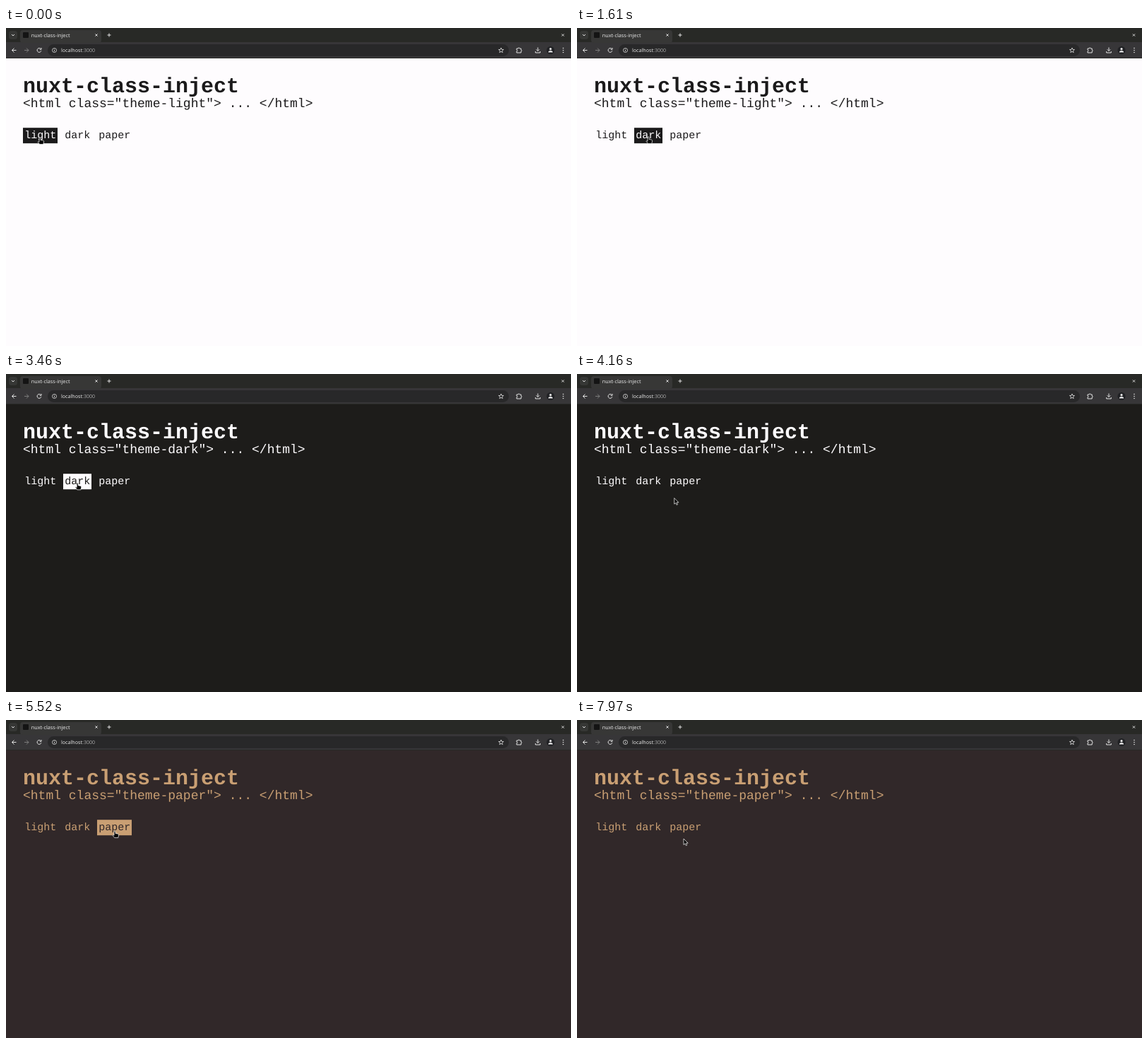
Recreate the animation shown at these times as an HTML page. Size 800 px wide and 450 px high, loop 8 s.

```html
<!DOCTYPE html>
<html lang="en">
<head>
<meta charset="utf-8">
<title>nuxt-class-inject</title>
<style>
  html, body { margin: 0; width: 100%; height: 100%; overflow: hidden; }
  svg { display: block; width: 800px; height: 450px; }
  text { white-space: pre; text-rendering: geometricPrecision; }
  #page { font-family: "Liberation Mono", monospace; }
  #chrome { font-family: "Noto Sans", sans-serif; }
  #icons { fill: none; stroke: #e2e2e2; }
</style>
</head>
<body>
<svg viewBox="0 0 800 450">
  <defs>
    <path id="plus" d="M-2.5 0h5M0-2.5v5"/>
    <path id="back" d="M3 0H-3M0-3L-3 0 0 3"/>
  </defs>
  <g id="page">
    <rect id="bg" width="800" height="450"/>
    <g id="ink">
      <text x="24" y="91" font-size="30" font-weight="bold">nuxt-class-inject</text>
      <text id="tag" x="24" y="112" font-size="18"></text>
    </g>
    <g id="buttons" font-size="15"></g>
  </g>
  <g id="chrome">
    <rect width="800" height="43" fill="#282926"/>
    <rect y="20" width="800" height="22" fill="#373638"/>
    <rect x="4" y="4" width="12" height="12" rx="3.5" fill="#363735"/>
    <rect x="20" y="3" width="115" height="18" rx="4" fill="#373736"/>
    <rect x="24" y="6" width="8" height="8" rx="1" fill="#141414"/>
    <text x="35.7" y="12.6" font-size="7.25" fill="#e2e2e2">nuxt-class-inject</text>
    <rect x="59" y="23" width="653" height="17" rx="8.5" fill="#282829"/>
    <text x="78" y="34" font-size="7.1" fill="#e2e2e2">localhost<tspan fill="#a2a2a2">:3000</tspan></text>
    <g id="icons">
      <path d="M8 9l2 2 2-2"/>
      <use href="#plus" transform="translate(128 10) rotate(45) scale(.9)"/>
      <use href="#plus" transform="translate(146 10)"/>
      <use href="#plus" transform="translate(788.5 10) rotate(45) scale(.9)"/>
      <use href="#back" transform="translate(11.5 31.5)"/>
      <use href="#back" transform="translate(29 31.5) scale(-1 1)" stroke="#7c7c7c"/>
      <path d="M49.3 29.7a2.9 2.9 0 1 0 .5 2.5M50 28v2.300h-2.300"/>
      <g stroke-width=".8">
        <circle cx="68.5" cy="31.5" r="3"/>
        <path d="M68.5 31v2.2M68.5 29.5v.8"/>
        <polygon id="star"/>
      </g>
      <path d="M723 29h2.200a1 1 0 0 1 2 0h2v2a1 1 0 0 1 0 2v2h-6.200v-2a1 1 0 0 0 0-2z"/>
      <path d="M753 27.5v5m-2.200-2.200l2.200 2.200 2.200-2.200M749.700 33v2h6.600v-2"/>
    </g>
    <circle cx="771" cy="31.5" r="5.5" fill="#202124"/>
    <g id="dots" fill="#e8e8e8">
      <circle cx="771" cy="29.7" r="1.6"/>
      <path d="M767.8 34.5a3.2 2.6 0 0 1 6.4 0z"/>
    </g>
  </g>
  <g fill="#050505" stroke="#fff" stroke-width=".7" stroke-linejoin="round">
    <path id="arrow" d="M0 0V8.500L2 6.800 3.300 9.700 4.700 9.100 3.500 6.200H6.200Z"/>
    <path id="hand" d="M-1 .4Q0-.7 1 .4V3.400L4.600 4.200Q5.700 4.500 5.600 5.800L4.800 9.600H-.3L-3 6.300Q-2.700 5-1 6.200Z"/>
  </g>
</svg>
<script>
const LOOP = 8000;
const BUTTON_TOP = 141.2, BUTTON_HEIGHT = 22;
const themes = [
  { at: 0, name: "light", bg: "#fefcfe", fg: "#1b1a1b" },
  { at: 2160, name: "dark", bg: "#1d1c1a", fg: "#fefcfe" },
  { at: 5520, name: "paper", bg: "#312829", fg: "#c99f73" },
];

// Each move eases to a new resting place, sagging below the straight line
const home = { x: 48, y: 155 };
const moves = [
  { from: 370, to: 1610, x: 101, y: 154, sag: 22 },
  { from: 3430, to: 4250, x: 139, y: 175, sag: 12 },
  { from: 4280, to: 4340, x: 147, y: 175, sag: 2 },
  { from: 4460, to: 4910, x: 154, y: 157, sag: 0 },
  { from: 7790, to: 7970, x: 151, y: 168, sag: 0 },
];

const $ = id => document.getElementById(id);
function add(parent, tag, attrs) {
  const el = document.createElementNS("http://www.w3.org/2000/svg", tag);
  for (const key in attrs) el.setAttribute(key, attrs[key]);
  return parent.appendChild(el);
}

for (const dy of [-3, 0, 3]) add($("dots"), "circle", { cx: 789, cy: 31.5 + dy, r: 0.8 });

$("star").setAttribute("points", Array.from({ length: 10 }, (_, i) => {
  const r = i % 2 ? 1.6 : 3.7, a = i * Math.PI / 5;
  return [701 + r * Math.sin(a), 31.7 - r * Math.cos(a)];
}).join(" "));

let left = 24;
const buttons = themes.map(({ name }) => {
  const x = left, w = name.length * 9 + 4;
  left += w + 8;
  const box = add($("buttons"), "rect", { x, y: BUTTON_TOP, width: w, height: BUTTON_HEIGHT });
  const label = add($("buttons"), "text", { x: x + 2.25, y: 156.4 });
  label.textContent = name;
  return { x, w, box, label };
});

function pointer(t) {
  let { x, y } = home;
  for (const m of moves) {
    const k = Math.min(1, Math.max(0, (t - m.from) / (m.to - m.from)));
    const e = k * k * (3 - 2 * k);
    x += (m.x - x) * e;
    y += (m.y - y) * e + m.sag * Math.sin(Math.PI * e);
  }
  return [x, y];
}

function draw(now) {
  const t = now % LOOP;
  const { name, bg, fg } = themes.findLast(theme => theme.at <= t);
  const [x, y] = pointer(t);
  let hovering = false;

  $("bg").setAttribute("fill", bg);
  $("ink").setAttribute("fill", fg);
  $("tag").textContent = `<html class="theme-${name}"> ... </html>`;
  for (const b of buttons) {
    const over = x >= b.x && x < b.x + b.w && y < BUTTON_TOP + BUTTON_HEIGHT;
    hovering ||= over;
    b.box.setAttribute("fill", over ? fg : bg);
    b.label.setAttribute("fill", over ? bg : fg);
  }
  for (const id of ["arrow", "hand"]) {
    $(id).setAttribute("transform", `translate(${x} ${y})`);
    $(id).style.display = (id === "hand") === hovering ? "" : "none";
  }
}

const start = performance.now();
function tick() {
  draw(performance.now() - start);
  requestAnimationFrame(tick);
}
tick();
</script>
</body>
</html>
```
